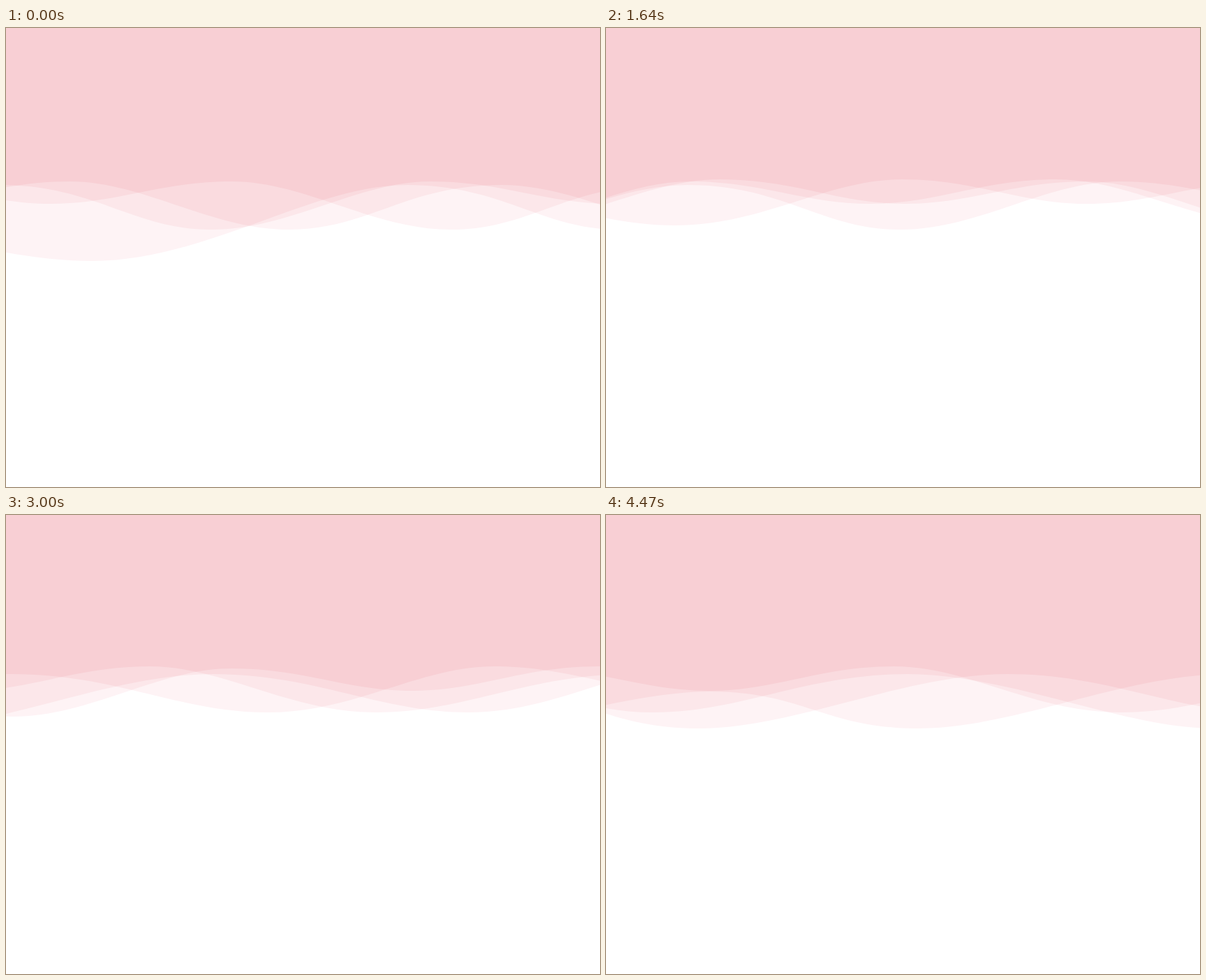
These frames come from a looping animation (851 px wide and 658 px high, 4570 ms). An HTML page:

```html
<!DOCTYPE html>
<html lang="en">
<head>
<meta charset="utf-8">
<title>Waves</title>
<style>
  html, body { margin: 0; width: 100%; height: 100%; overflow: hidden; background: #fff; }
  svg { display: block; width: 851px; height: 658px; isolation: isolate; }
  path { fill: #020c0b; mix-blend-mode: plus-lighter; }
</style>
</head>
<body>
<svg viewBox="0 0 851 658">
  <rect width="851" height="658" fill="#f8cfd4"/>
</svg>
<script>
const LOOP = 4570;
const LAST_STEP = 57;
const svg = document.querySelector('svg');

// Crests and troughs of the wave that all layers share: [x, y]
const WAVE = [
  [-1509, 253], [-1069, 334], [-618, 225], [-314, 289], [0, 220], [260, 252],
  [525, 217], [850, 283], [1215, 228], [1657, 306], [1957, 253], [2397, 334]
];

// Steady drift in pixels per step; layers moving right show the wave mirrored
const LAYERS = [
  { x: 1193, speed: -22.9 },
  { x: 608, speed: -24.4 },
  { x: 92, speed: 29.8 },
  { x: 324, speed: 31.25 }
];

// Level handle of equal length on both sides of a crest or trough
function handle(i) {
  const left = WAVE[Math.max(0, i - 1)][0];
  const right = WAVE[Math.min(WAVE.length - 1, i + 1)][0];
  return (right - left) * 0.182;
}

function wavePath() {
  let d = `M${WAVE[0][0]},700V${WAVE[0][1]}`;
  for (let i = 1; i < WAVE.length; i++) {
    const [x0, y0] = WAVE[i - 1];
    const [x1, y1] = WAVE[i];
    d += `C${x0 + handle(i - 1)},${y0} ${x1 - handle(i)},${y1} ${x1},${y1}`;
  }
  return d + 'V700Z';
}

const shape = wavePath();
for (const layer of LAYERS) {
  layer.el = document.createElementNS('http://www.w3.org/2000/svg', 'path');
  layer.el.setAttribute('d', shape);
  svg.append(layer.el);
}

// 14 slots a second; the first two and then one in twenty are held
function stepAt(ms) {
  const slot = Math.floor((ms + 5) * 14 / 1000);
  const held = 2 + Math.floor((slot + 9) / 20);
  return Math.min(LAST_STEP, Math.max(0, slot - held));
}

function draw(ms) {
  const step = stepAt(ms % LOOP);
  for (const { el, x, speed } of LAYERS) {
    const shift = (x + speed * step).toFixed(2);
    el.setAttribute('transform', `translate(${shift} 0) scale(${-Math.sign(speed)} 1)`);
  }
}

let start;
function tick(now) {
  start ??= now;
  draw(now - start);
  requestAnimationFrame(tick);
}
draw(0);
requestAnimationFrame(tick);
</script>
</body>
</html>
```
